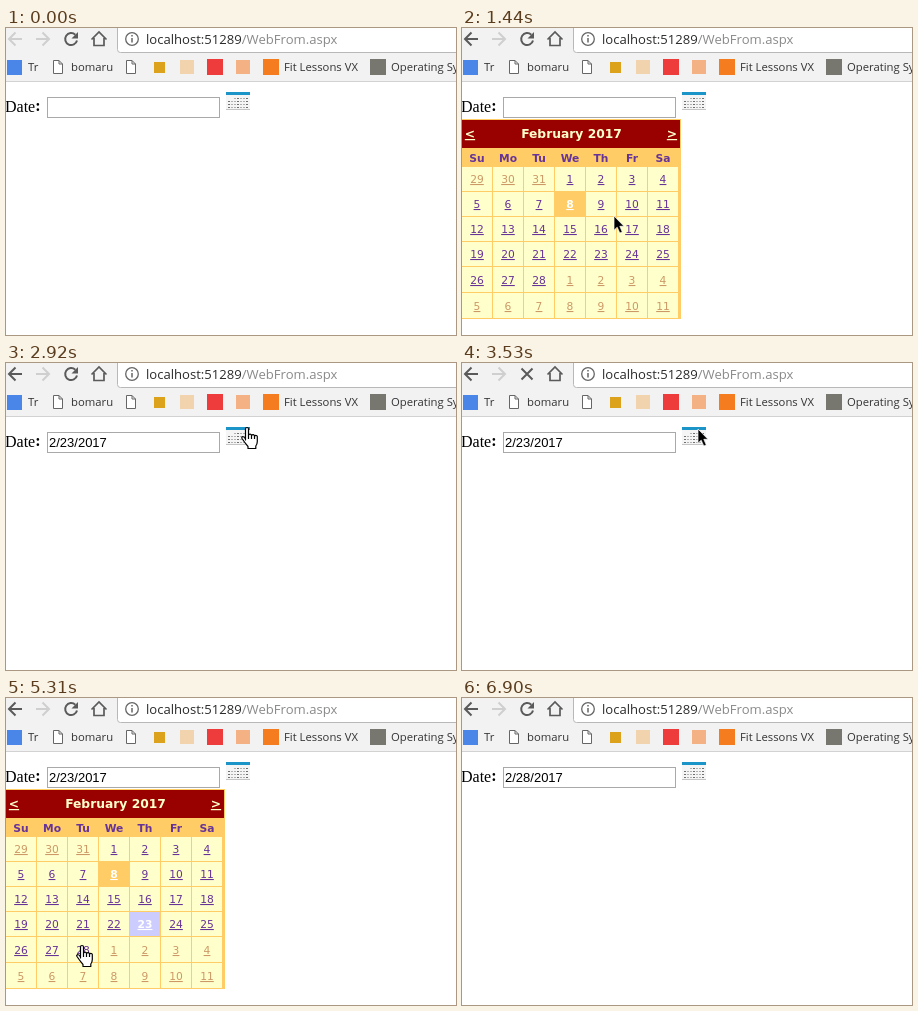
Write an HTML page that moves like this. It is 450x307 px and loops after 7280 ms.

```html
<!DOCTYPE html>
<html lang="en">
<head>
<meta charset="utf-8">
<title>Date picker</title>
<style>
  html, body { margin: 0; width: 100%; height: 100%; overflow: hidden; background: #fff; }
  svg { display: block; width: 450px; height: 307px; }
  rect { shape-rendering: crispEdges; }
  .ui { font-family: "Open Sans", sans-serif; }
  .url { font-size: 13.1px; }
  .mark { font-size: 11.3px; fill: #333; }
  .label { font: 16px "Liberation Serif", serif; }
  .label tspan { font-weight: bold; }
  .value { font: 13px "Liberation Sans", sans-serif; }
  .cal { font: 10.7px "DejaVu Sans", sans-serif; text-anchor: middle; fill: #639; }
  .cal .head { font-weight: bold; }
  .cal .title { font-weight: bold; font-size: 12.3px; fill: #ffc; }
  .cal .link { text-decoration: underline; }
  .cal .other { fill: #c96; }
  .cal .lit { fill: #fff; font-weight: bold; }
  .icon { fill: none; stroke: #5a5a5a; stroke-width: 2; }
  .thin { stroke-width: 1.7; }
  .off { stroke: #cfcfcf; }
</style>
</head>
<body>
<svg viewBox="0 0 450 307" xmlns="http://www.w3.org/2000/svg">
  <g id="browser" class="ui">
    <rect width="450" height="53" fill="#f2f2f2"/>
    <rect y="53" width="450" height="1" fill="#d2d2d2"/>
    <path d="M111.500-5V21.500q0 3 3 3H455V-5z" fill="#fff" stroke="#b8b8b8"/>
    <path id="back" class="icon" d="M16 11H3M9.500 4.500L3 11l6.500 6.500"/>
    <path class="icon off" d="M30 11h13M36.500 4.500L43 11l-6.500 6.500"/>
    <g id="reload">
      <path class="icon" d="M69.300 6.700A6 6 0 1 0 71 12.500"/>
      <path d="M72 4v6.500h-6.500z" fill="#5a5a5a"/>
    </g>
    <path id="stop" class="icon" d="M59.500 5.500l11 11M70.500 5.500l-11 11"/>
    <path class="icon thin" d="M85.500 11.500L93 4l7.500 7.500M88 10v7.500h10V10"/>
    <circle cx="126" cy="11" r="6.300" fill="none" stroke="#666" stroke-width="1.300"/>
    <path d="M126 10v4.500M126 7v1.600" stroke="#666" stroke-width="1.500"/>
    <text class="url" x="140" y="16" fill="#2b2b2b">localhost:51289<tspan fill="#8a8a8a">/WebFrom.aspx</tspan></text>
    <text class="mark" x="22" y="43">Tr</text>
    <text class="mark" x="65" y="43">bomaru</text>
    <text class="mark" x="278" y="43">Fit Lessons VX</text>
    <text class="mark" x="385" y="43">Operating System</text>
  </g>
  <text class="label" x="-1" y="84">Date<tspan dy="-1">:</tspan></text>
  <rect x="41.500" y="69.500" width="172" height="20" fill="#fff" stroke="#a9a9a9"/>
  <text id="value" class="value" x="43" y="84"></text>
  <g id="picker">
    <rect x="220" y="64" width="24" height="18" fill="#f5f5f5"/>
    <rect x="220" y="64" width="24" height="3" fill="#1b94c8"/>
    <rect x="220" y="81" width="24" height="1" fill="#c4c4c4"/>
  </g>
  <g id="cal" class="cal"></g>
  <g id="cursor">
    <path id="arrow" d="M0 0V14.200L3.200 11.200 5.800 17 8.300 16 5.800 10.300H10z" stroke="#fff" stroke-width=".7"/>
    <g id="hand" fill="#fff" stroke="#000" stroke-width="1.200" stroke-linejoin="round">
      <path d="M-1.500 13V2a1.500 1.500 0 0 1 3 0V8.500a1.500 1.500 0 0 1 3 .3a1.500 1.500 0 0 1 3 .7a1.400 1.400 0 0 1 2.800 .8V14.500q0 2.500-1.500 4.500V21.500H1V19.500Q-2 16-5 11.500q-.6-1.500 .7-2q1.300 0 2.800 2.500z"/>
      <path d="M1.500 8.500V12M4.500 8.800V12M7.500 9.500V12"/>
    </g>
  </g>
</svg>
<script>
const LOOP = 7280;
const $ = id => document.getElementById(id);

function add(parent, tag, attrs, text) {
  const el = document.createElementNS("http://www.w3.org/2000/svg", tag);
  for (const key in attrs) el.setAttribute(key, attrs[key]);
  if (text !== undefined) el.textContent = text;
  parent.appendChild(el);
  return el;
}
const box = (parent, x, y, width, height, fill) =>
  add(parent, "rect", { x, y, width, height, fill });

// Bookmark icons: page outlines and plain squares
for (const x of [47.5, 120.5]) {
  add($("browser"), "path", {
    d: `M${x} 32.500h5.500l3.500 3.500v9.500h-9zM${x + 5.5} 32.500v3.500h3.500`,
    fill: "#fff", stroke: "#666"
  });
}
[
  [1, 15, "#4a86e8"], [148, 11, "#dda21c"], [174, 14, "#f1d3ae"],
  [201, 16, "#ee3b3b"], [230, 14, "#f3b184"], [257, 16, "#f57d20"], [364, 16, "#77776f"]
].forEach(([x, size, fill]) => box($("browser"), x, 39 - Math.floor(size / 2), size, size, fill));

// Picker icon dots
for (let r = 0; r < 4; r++)
  for (let c = 0; c < 7; c++)
    if (r || c > 1) box($("picker"), 222 + c * 3, 70 + r * 3, 2, 1, c % 3 ? "#b0b0b0" : "#707070");

// Calendar grid; the last two rows are a pixel taller
const cal = $("cal");
const edgeX = c => Math.floor(c * 31.14 - 1);
const edgeY = r => 138 + r * 25 + Math.max(0, r - 4);
const middle = (edge, i) => Math.ceil((edge(i) + 1 + edge(i + 1)) / 2);

box(cal, 0, 91, 219, 200, "#fc6");
box(cal, 0, 92, 218, 28, "#900");
add(cal, "text", { x: 109.5, y: 110, class: "title" }, "February 2017");
add(cal, "text", { x: 8, y: 110, class: "title link" }, "<");
add(cal, "text", { x: 210, y: 110, class: "title link" }, ">");
["Su", "Mo", "Tu", "We", "Th", "Fr", "Sa"].forEach((name, c) =>
  add(cal, "text", { x: middle(edgeX, c), y: 134, class: "head" }, name));

const cells = [];
for (let i = 0; i < 42; i++) {
  const c = i % 7, r = Math.floor(i / 7);
  const date = new Date(2017, 0, 29 + i), day = date.getDate();
  const inMonth = date.getMonth() === 1;
  const today = inMonth && day === 8;
  const left = edgeX(c) + 1, top = edgeY(r) + 1;
  const x = middle(edgeX, c), y = middle(edgeY, r);
  const rect = box(cal, left, top, edgeX(c + 1) - left, edgeY(r + 1) - top, today ? "#fc6" : "#ffc");
  const text = add(cal, "text", {
    x, y: y + 4,
    class: "link" + (inMonth ? "" : " other") + (today ? " lit" : "")
  }, day);
  cells.push({ x, y, rect, text });
}
const chosen = cells[25];

// Cursor moves: start, end, steps, x, y
const moves = [
  [60, 560, 8, 236, 77],
  [840, 1500, 10, 143, 200],
  [1580, 1580, 1, 139, 206],
  [1660, 1660, 1, 139, 216],
  [1800, 1880, 2, 139, 221],
  [2560, 2920, 6, 241, 64],
  [3000, 3000, 1, 244, 64],
  [3150, 3230, 2, 236, 66],
  [3610, 3970, 6, 209, 234],
  [4050, 4110, 2, 201, 250],
  [4190, 4490, 5, 138, 270],
  [4565, 4790, 4, 75, 248],
  [5090, 5160, 2, 73, 248],
  [5235, 5310, 2, 76, 247],
  [6240, 6900, 10, 396, 320]
];
// Each postback: loading starts, page swaps, loading ends
const posts = [[620, 780, 840], [2190, 2330, 2560], [3390, 3540, 3610], [5850, 6010, 6240]];
const values = ["", "", "2/23/2017", "2/23/2017", "2/28/2017"];

function cursorAt(t) {
  let x = 255, y = 311;
  for (const [from, to, n, toX, toY] of moves) {
    if (t < from) break;
    const step = n > 1 ? Math.floor((t - from) / (to - from) * (n - 1) + 0.01) : 0;
    let p = Math.min(1, (step + 1) / n);
    if (from === 60) p = Math.sin(p * Math.PI / 2);
    x += (toX - x) * p;
    y += (toY - y) * p;
  }
  return [Math.round(x), Math.round(y)];
}

function overLink(x, y, open) {
  if (x >= 220 && x <= 244 && y >= 64 && y <= 82) return true;
  return open && cells.some(cell => Math.abs(x - cell.x) <= 8 && Math.abs(y - cell.y) <= 5);
}

const show = (el, on) => { el.style.display = on ? "" : "none"; };

function draw(t) {
  const page = posts.filter(p => t >= p[1]).length;
  const loading = posts.some(p => t >= p[0] && t < p[2]);
  const open = page % 2 === 1;
  const picked = page === 3;
  const [x, y] = cursorAt(t);
  const hand = !loading && overLink(x, y, open);

  $("back").classList.toggle("off", page === 0);
  show($("stop"), loading);
  show($("reload"), !loading);
  show(cal, open);
  $("value").textContent = values[page];
  chosen.rect.setAttribute("fill", picked ? "#ccf" : "#ffc");
  chosen.text.classList.toggle("lit", picked);
  show($("cursor"), t >= 60 && y < 307);
  $("cursor").setAttribute("transform", `translate(${x} ${y})`);
  show($("hand"), hand);
  show($("arrow"), !hand);
}

function tick() {
  draw(performance.now() % LOOP);
  requestAnimationFrame(tick);
}
tick();
</script>
</body>
</html>
```
